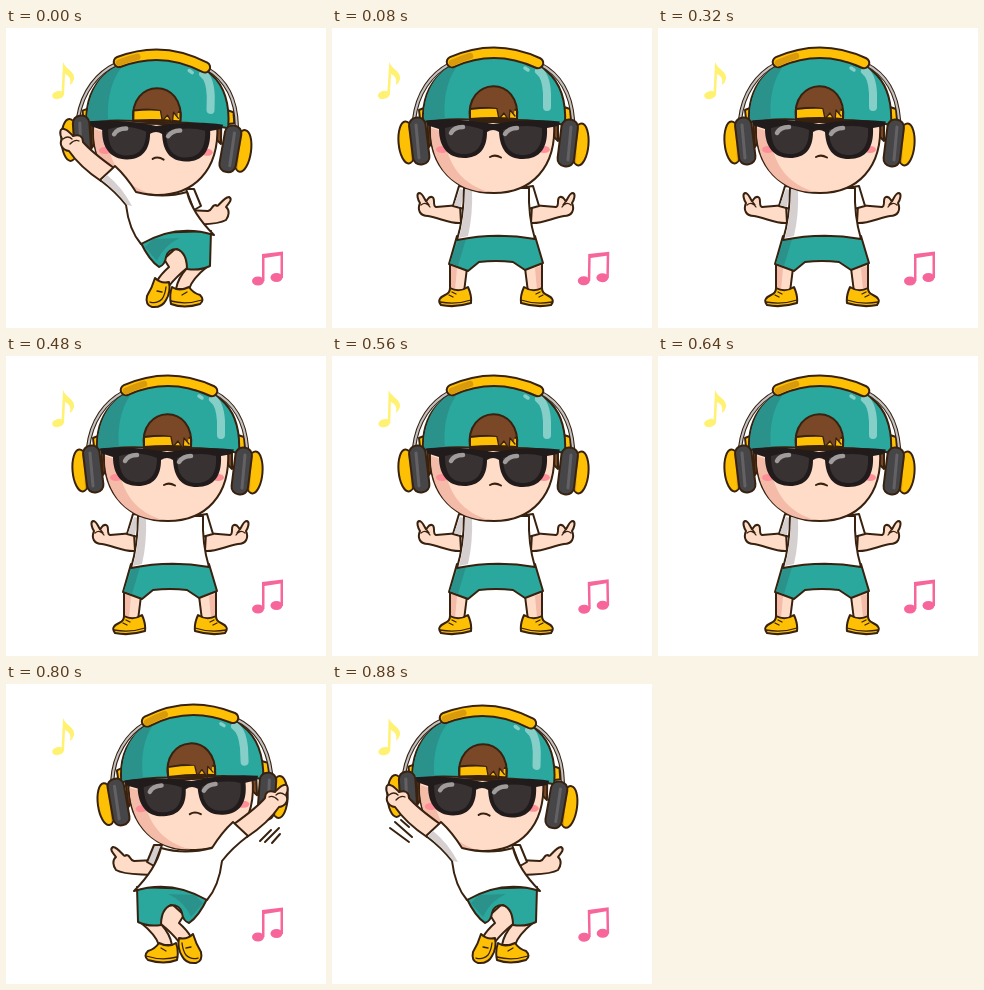
An HTML page that plays this animation: 320 px wide and 300 px high, repeating every 960 ms.

```html
<!DOCTYPE html>
<html>
<head>
<meta charset="utf-8">
<style>
  html, body { margin: 0; width: 100%; height: 100%; overflow: hidden; background: #fff; }
  svg { display: block; }
  .o { stroke: #38220f; stroke-width: 2; stroke-linejoin: round; stroke-linecap: round; }
  .line { fill: none; }
  .thin { stroke-width: 1.3; }
  .skin { fill: #ffdcc8; }
  .tan { fill: #f4bba9; }
  .teal { fill: #2aa89d; }
  .deep { fill: #2b928b; }
  .gold { fill: #fec005; }
  .amber { fill: #d99a0c; }
  .hair { fill: #7a4826; }
  .dark { fill: #464547; }
  .white { fill: #fff; }
  .grey { fill: #d5cfd0; }
</style>
</head>
<body>
<svg width="320" height="300" viewBox="0 0 320 300">
  <defs>
    <g id="head">
      <path class="o gold" d="M97 78L87 82 88 91 100 93ZM226 77L238 81 239 92 226 94Z"/>
      <path class="o hair" d="M95 92L97 119 101 113 105 122 110 93ZM226 92L226 113 221 108 217 118 212 93Z"/>
      <path class="o skin" d="M98 94C96 140 124 165 162 165C199 165 225 140 222 94Z"/>
      <path class="tan" d="M99 100C98 140 124 164 157 164C132 157 114 138 112 104Z"/>
      <ellipse cx="110" cy="121.500" rx="6" ry="3.500" fill="#ff8f97"/>
      <ellipse cx="212" cy="121.500" rx="6" ry="3.500" fill="#ff8f97"/>
      <path class="o line" d="M158 129Q163 126 169 129.500"/>
      <path class="o teal" d="M91 94C89 52 118 28 161 28C206 28 236 46 233 97Q196 90 161 93Q120 89 91 94Z"/>
      <path class="deep" d="M92 93C91 62 106 40 130 33C116 46 111 69 113 91Z"/>
      <g fill="none" stroke="#86cfc9" stroke-linecap="round">
        <path d="M207 43Q214 48 215 65V79" stroke-width="8"/>
        <path d="M193 40L196 42" stroke-width="3.500"/>
      </g>
      <path class="o hair" d="M138 92C132 48 190 46 185 92Z"/>
      <path class="o gold" d="M138 81Q161 78 185 82V91Q161 89 138 91Z"/>
      <path class="hair" d="M142 77C150 64 176 62 183 78L182 86 178 82 177 93 172 85 167 91 165 80Z"/>
      <path class="o line thin" d="M165 81L167 91 172 85 177 93 178 82 183 88"/>
      <path d="M94 92.500C114 90 140 92 161 96C183 92 208 91 228 93.500L226 98 215 100C216 120 208 131 191 131C175 131 168 121 167 104Q161 100 155 104C155 121 147 130 132 130C116 130 107 119 107 101L96 97.500Z" fill="#211b1c"/>
      <path d="M113 100Q132 94 151 102C151 119 144 126 132 126C119 126 113 117 113 100ZM171 102Q192 95 210 100C211 118 204 127 191 127C179 127 171 119 171 102Z" fill="#383232"/>
      <path d="M119 105Q122 99 131 99M173 106Q177 100 185 100" fill="none" stroke="#a09c9b" stroke-width="4.500" stroke-linecap="round"/>
    </g>

    <g id="phones">
      <g fill="none" stroke-linecap="round">
        <path d="M82 92C85 65 99 46 118 36M241 92C239 65 227 46 208 36" stroke="#38220f" stroke-width="4.200"/>
        <path d="M82 92C85 65 99 46 118 36M241 92C239 65 227 46 208 36" stroke="#c3c2c4" stroke-width="2"/>
        <path d="M120 34Q163 15 206 35" stroke="#38220f" stroke-width="12.500"/>
        <path d="M120 34Q163 15 206 35" stroke="#fec005" stroke-width="8.500"/>
        <path d="M120 35Q128 31 138 28" stroke="#d99a0c" stroke-width="6.500"/>
      </g>
      <g id="cup">
        <ellipse class="o gold" cx="75" cy="114.500" rx="8.500" ry="21" transform="rotate(-5 75 114)"/>
        <path class="amber" d="M76 95Q79 115 79 134L83 125 81 98Z"/>
        <rect class="o dark" x="79" y="89.500" width="16.500" height="47" rx="7.500" transform="rotate(-7 87.500 113)"/>
        <path d="M84 97L87 130" stroke="#636164" stroke-width="3" stroke-linecap="round"/>
      </g>
      <use href="#cup" transform="translate(323 2) scale(-1 1)"/>
    </g>

    <g id="stance">
      <g id="limb">
        <path class="o skin" d="M118 235V264H132L135 240Z"/>
        <path class="tan" d="M119 238V262H123L125 240Z"/>
        <path class="o gold" d="M118 260Q127 265 136 259Q140 268 139 275Q123 280 109 277Q104 271 113 267Q118 265 118 260Z"/>
        <path class="o line thin" d="M108 274Q124 277 139 272M117 267L121 269M120 264L124 266"/>
        <path class="o skin" d="M128 177L104 179C100 178 104 170 100 169C96 168 96 172 94 173C92 171 91 165 87 165C84 166 86 172 88 175C85 182 88 188 96 188C108 190 118 196 129 195Z"/>
        <path class="o line thin" d="M89 177Q94 173 98 179M94 173L97 177"/>
        <path class="o white" d="M127 158L121 178 132 181 140 160Z"/>
      </g>
      <use href="#limb" transform="translate(328) scale(-1 1)"/>
      <path class="grey" d="M128 161L122 177 129 179 132 162Z"/>
      <path class="o teal" d="M125 208L117 236 136 243 147 234Q164 232 181 234L193 242 211 235 203 208Z"/>
      <path class="deep" d="M126 212L118 235 126 238 134 211Z"/>
      <path class="o white" d="M132 160Q132 188 125 212Q164 204 203 211Q196 188 197 160Z"/>
      <path class="grey" d="M133 161Q133 188 127 210L136 208Q141 187 140 161Z"/>
    </g>

    <g id="lean">
      <path class="o skin" d="M179 226L181 240Q172 250 170 261H183Q186 251 202 238V226Z"/>
      <path class="o gold" d="M166 259Q173 264 183 259Q187 265 194 267Q199 272 194 276Q178 281 165 276Q163 267 166 259Z"/>
      <path class="o line thin" d="M165 273Q180 277 196 272M176 267L181 264"/>
      <path class="o skin" d="M158 231L163 239Q155 246 151 253L163 258Q170 249 181 240Q182 222 169 221Z"/>
      <path class="o gold" d="M149 250Q155 256 163 254Q165 264 160 272Q156 280 146 279Q139 277 141 268Q146 260 149 250Z"/>
      <path class="o line thin" d="M144 274Q151 276 156 271Q159 267 160 259M151 263L156 264"/>
      <path class="o teal" d="M145 205L135 215Q143 232 153 239Q159 237 160 229Q162 221 171 221Q181 225 181 241Q194 243 204 238L205 203Z"/>
      <path class="deep" d="M147 211L139 219 151 233Q158 217 174 210Z"/>
      <path id="hand" class="o skin" d="M186 176L208 177C213 176 211 171 216 171C218 175 222 164 229 163C233 165 229 169 226 173C230 176 229 182 226 186C218 191 203 190 191 191Z"/>
    </g>

    <path id="sleeve" class="o" d="M180 161L188 161 195 178 188 182Z"/>

    <g id="lift">
      <path class="o skin" d="M95 153Q74 139 63 123C56 122 53 116 56 111C53 105 54 100 58 101C62 102 64 105 67 108C73 106 77 108 77 114C83 121 94 130 108 140Z"/>
      <path class="o line thin" d="M57 111Q62 107 66 111M64 116Q69 111 73 113"/>
      <path class="o white" d="M109 138Q120 148 130 164Q157 171 181 164Q186 185 208 207Q171 195 135 216Q123 202 120 177Q110 164 94 152Z"/>
    </g>
  </defs>

  <g id="yellow" fill="#fff172">
    <ellipse cx="52" cy="67" rx="6" ry="4" transform="rotate(-15 52 67)"/>
    <path d="M57 34C60 42 69 43 68 51Q67 55 64 57Q66 49 59 46L58 67H55.500Z"/>
  </g>
  <g id="pink" fill="#f7669b">
    <ellipse cx="252" cy="253" rx="6" ry="4.500"/>
    <ellipse cx="270.500" cy="249.500" rx="6" ry="4.500"/>
    <path d="M256 226L277 223.500V250H274.500V227.500L258.500 230V253H256Z"/>
  </g>

  <g id="center">
    <use href="#stance"/><use href="#head"/><use href="#phones"/>
  </g>
  <g id="left">
    <use href="#lean"/>
    <use href="#sleeve" fill="#fff"/>
    <use href="#head" transform="translate(-11 2) rotate(1 163 110)"/>
    <use href="#phones" transform="translate(-11 2) rotate(3 163 110)"/>
    <use href="#lift"/>
    <path class="grey" d="M96 152L101 147Q116 159 126 178L121 177Q111 164 96 152Z"/>
    <path class="o line whoosh" d="M58 144L77 158M63 138L80 153M69 136L77 143"/>
  </g>
  <g id="right">
    <g transform="translate(336) scale(-1 1)"><use href="#lean"/><use href="#sleeve" fill="#d5cfd0"/></g>
    <use href="#head" transform="translate(25 1) rotate(-2.500 163 110)"/>
    <use href="#phones" transform="translate(25 1) rotate(-3 163 110)"/>
    <use href="#lift" transform="translate(336) scale(-1 1)"/>
    <path class="o line whoosh" d="M254 157L265 146M259 158L273 144M266 159L274 150"/>
  </g>
</svg>
<script>
  const $ = id => document.getElementById(id);
  const show = (el, on) => { el.style.display = on ? '' : 'none'; };

  function draw(now) {
    const step = Math.floor(now % 960 / 80);
    const pose = step % 11 === 0 ? 'left' : step < 9 ? 'center' : 'right';
    for (const id of ['left', 'center', 'right']) show($(id), id === pose);
    document.querySelectorAll('.whoosh').forEach(el => show(el, step >= 10));
    $('hand').setAttribute('transform', step ? '' : 'translate(-6 6)');

    const sway = Math.sin(step * Math.PI / 2);
    $('yellow').setAttribute('transform', `rotate(${sway} 57 52)`);
    $('pink').setAttribute('transform', `rotate(${sway} 262 240)`);
  }

  function loop(now) {
    draw(now);
    requestAnimationFrame(loop);
  }
  draw(0);
  requestAnimationFrame(loop);
</script>
</body>
</html>
```
